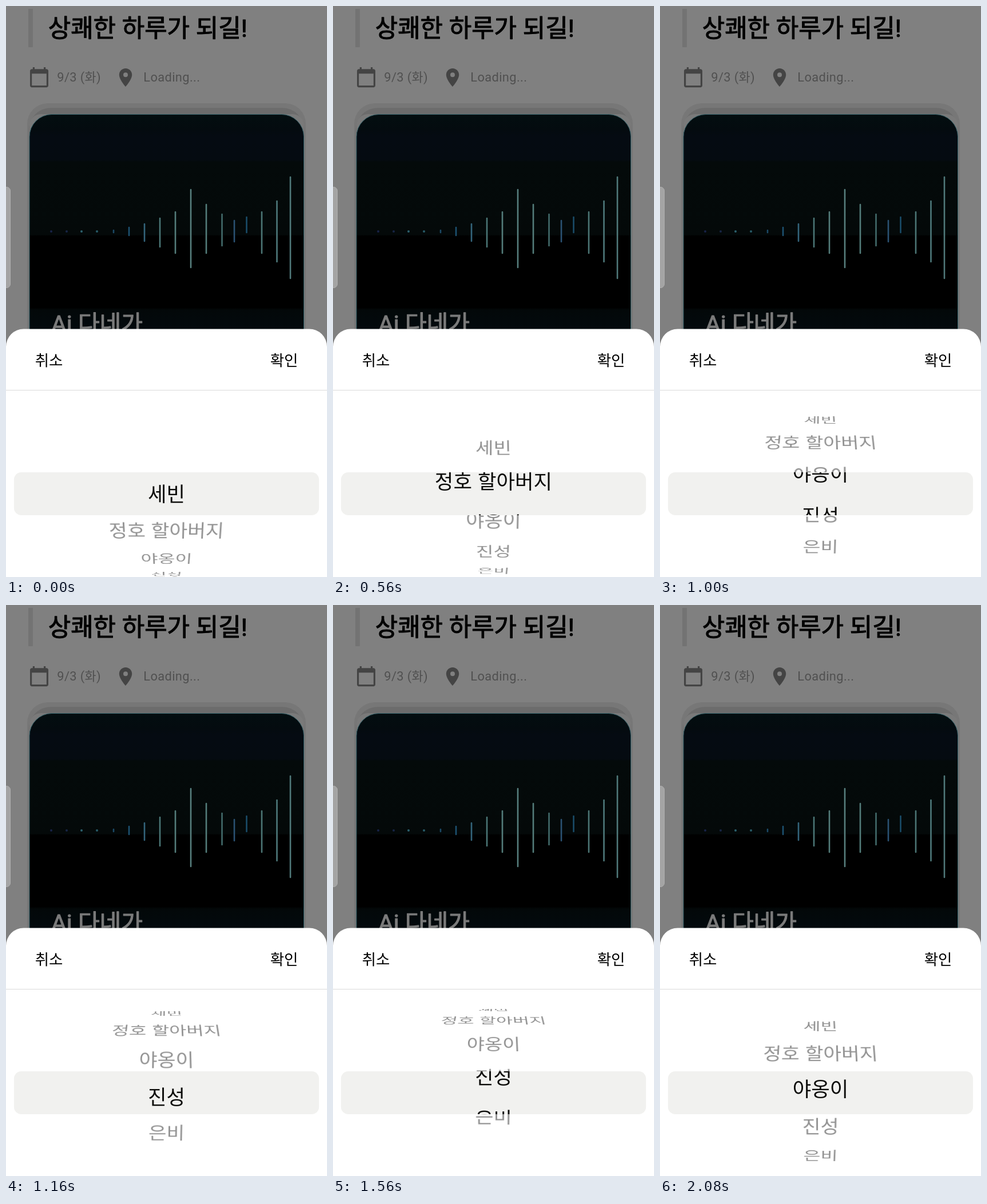
Write an HTML page that moves like this. It is 561 by 998 pixels and loops after 2.12 s.

```html
<!DOCTYPE html>
<html lang="ko">
<head>
<meta charset="utf-8">
<title>Wheel picker</title>
<style>
  html, body { margin: 0; width: 561px; height: 998px; overflow: hidden; background: #808080; }
  body { position: relative; font-family: Roboto, "Noto Sans CJK KR", "Noto Sans CJK JP", sans-serif; }
  svg, .wheel, .drum, .band, .tint, .item { position: absolute; left: 0; width: 561px; }
  svg { top: 0; height: 998px; }
  .heading { stroke-width: 1.1; stroke-linejoin: round; }
  .wheel { top: 672px; height: 326px; overflow: hidden; }
  .drum { top: 143px; height: 75px; opacity: .43; }
  .band { top: 815px; height: 74.5px; overflow: hidden; background: #fff; }
  .item { top: 0; height: 75px; text-align: center; color: #000; white-space: pre;
          font: 35.4px/71px "Noto Sans CJK KR", "Noto Sans CJK JP", sans-serif; }
  .tint { left: 14px; top: 815px; width: 533px; height: 74.5px; border-radius: 12.5px; background: rgba(115,115,100,.1); }
</style>
</head>
<body>
<svg viewBox="0 0 561 998">
  <defs>
    <linearGradient id="night" x1="0" y1="189" x2="0" y2="569" gradientUnits="userSpaceOnUse">
      <stop offset="0" stop-color="#030e10"/>
      <stop offset=".07" stop-color="#040b0f"/>
      <stop offset=".1" stop-color="#050b12"/>
      <stop offset=".21" stop-color="#050b11"/>
      <stop offset=".22" stop-color="#040a0a"/>
      <stop offset=".555" stop-color="#040909"/>
      <stop offset=".56" stop-color="#000"/>
      <stop offset=".89" stop-color="#000"/>
      <stop offset=".9" stop-color="#030809"/>
      <stop offset="1" stop-color="#030a0e"/>
    </linearGradient>
  </defs>
  <rect x="39" y="5" width="8" height="67" fill="#737373"/>
  <text class="heading" x="73.7" y="54" font-size="42.9" stroke="#000">상쾌한 하루가 되길!</text>
  <g fill="#444">
    <path transform="translate(38.8 105.4) scale(1.6)" d="M20 3h-1V1h-2v2H7V1H5v2H4c-1.1 0-2 .9-2 2v16c0 1.1.9 2 2 2h16c1.1 0 2-.9 2-2V5c0-1.1-.9-2-2-2zm0 18H4V8h16v13z"/>
    <path transform="translate(189.8 105.8) scale(1.6)" d="M12 2C8.13 2 5 5.13 5 9c0 5.25 7 13 7 13s7-7.75 7-13c0-3.87-3.13-7-7-7zm0 9.5a2.5 2.5 0 1 1 0-5 2.5 2.5 0 0 1 0 5z"/>
  </g>
  <g font-size="21.8" letter-spacing=".39" fill="#505050">
    <text x="89.3" y="132">9/3 (화)</text>
    <text x="240.3" y="132">Loading...</text>
  </g>
  <rect x="37" y="170" width="487" height="500" rx="36" fill="#777"/>
  <rect x="40" y="178" width="481" height="500" rx="38" fill="#6c6c6c"/>
  <rect x="41" y="189" width="479.5" height="500" rx="20" fill="#7a7a7a"/>
  <rect x="41" y="189.5" width="479.5" height="500" rx="39" fill="url(#night)" stroke="#35626a"/>
  <g id="wave" stroke-width="2.6" stroke-linecap="round"></g>
  <text class="heading" x="79" y="570" font-size="41" fill="#7b7b7b" stroke="#7b7b7b">Ai 다네가</text>
  <path d="M0 316.5h1a6.5 6.5 0 0 1 6.5 6.5v163a6.5 6.5 0 0 1-6.5 6.5h-1" fill="#a4a4a4" stroke="#b0b0b0"/>
  <rect y="564.5" width="561" height="500" rx="31" fill="#fff"/>
  <g font-size="26.5">
    <text x="50.7" y="628.5">취소</text>
    <text x="461.7" y="628.5">확인</text>
  </g>
  <rect y="671" width="561" height="1" fill="#d9d9d9"/>
</svg>
<div class="wheel"><div class="drum" id="drum"></div></div>
<div class="band" id="band"></div>
<div class="tint"></div>
<script>
const LOOP = 2120, STEP = 40;
const PITCH = 74.8, RADIUS = 192.6, ANGLE = 0.3462, DEPTH = 519.4;
const names = ['세빈', '정호 할아버지', '야옹이', '진성', '은비'];

// x, top, bottom, colour
const bars = [
  [79, 394, 394, '#182348'], [106, 394, 394, '#182546'], [132, 394, 394, '#2c616d'], [159, 394, 394, '#285c68'],
  [188, 392, 396, '#1c4a68'], [215, 387, 401, '#1d5272'], [242, 381, 411, '#34657c'], [269, 371, 421, '#4b7676'],
  [296, 360, 432, '#547d7b'], [323, 321, 457, '#577f7e'], [350, 347, 432, '#547d7b'], [377.5, 364, 419, '#436c6c'],
  [399, 375, 412, '#2b5273'], [420.5, 369, 396, '#1a4d6a'], [447, 360, 432, '#4c7675'], [473.5, 341, 447, '#4f7a7c'],
  [497, 299, 476, '#50797a']
];
document.getElementById('wave').innerHTML = bars.map(([x, top, bottom, colour]) =>
  `<path d="M${x} ${top}V${bottom + .01}" stroke="${colour}" ${top === bottom ? 'stroke-width="4"' : ''}/>`).join('');

function addItems(id) {
  return names.map(name => {
    const item = document.createElement('div');
    item.className = 'item';
    item.textContent = name;
    return document.getElementById(id).appendChild(item);
  });
}
const drum = addItems('drum'), flat = addItems('band');

// time, wheel position in items
const forward = [[320, 0], [360, .16], [560, 1.3], [700, 1.78], [840, 1.99], [880, 2.12], [1160, 2.9], [1360, 3.28]];
const back = [[1560, 3.39], [1800, 2.6], [2080, 2.09]];

// Monotone cubic through the points
function curve(points, t) {
  const last = points.length - 1;
  if (t <= points[0][0]) return points[0][1];
  if (t >= points[last][0]) return points[last][1];
  const slope = i => (points[i + 1][1] - points[i][1]) / (points[i + 1][0] - points[i][0]);
  const tangent = i => {
    if (i === 0) return slope(0);
    if (i === last) return slope(last - 1) * .7;
    const a = slope(i - 1), b = slope(i);
    return 2 * a * b / (a + b);
  };
  const i = points.findIndex(p => p[0] > t) - 1;
  const [t0, p0] = points[i], [t1, p1] = points[i + 1];
  const h = t1 - t0, u = (t - t0) / h, v = 1 - u;
  return p0 * v * v * (1 + 2 * u) + p1 * u * u * (3 - 2 * u)
    + h * u * v * (tangent(i) * v - tangent(i + 1) * u);
}

function draw(now) {
  const t = Math.floor(now % LOOP / STEP) * STEP;
  const position = curve(t < 1560 ? forward : back, t);
  names.forEach((_, i) => {
    const k = i - position;
    drum[i].style.visibility = Math.abs(k) < 3.99 ? 'visible' : 'hidden';
    drum[i].style.transform =
      `perspective(${DEPTH}px) translateZ(${-RADIUS}px) rotateX(${-k * ANGLE}rad) translateZ(${RADIUS}px)`;
    flat[i].style.transform = `translateY(${k * PITCH}px)`;
  });
}

let start;
function tick(now) {
  start ??= now;
  draw(now - start);
  requestAnimationFrame(tick);
}
draw(0);
requestAnimationFrame(tick);
</script>
</body>
</html>
```
